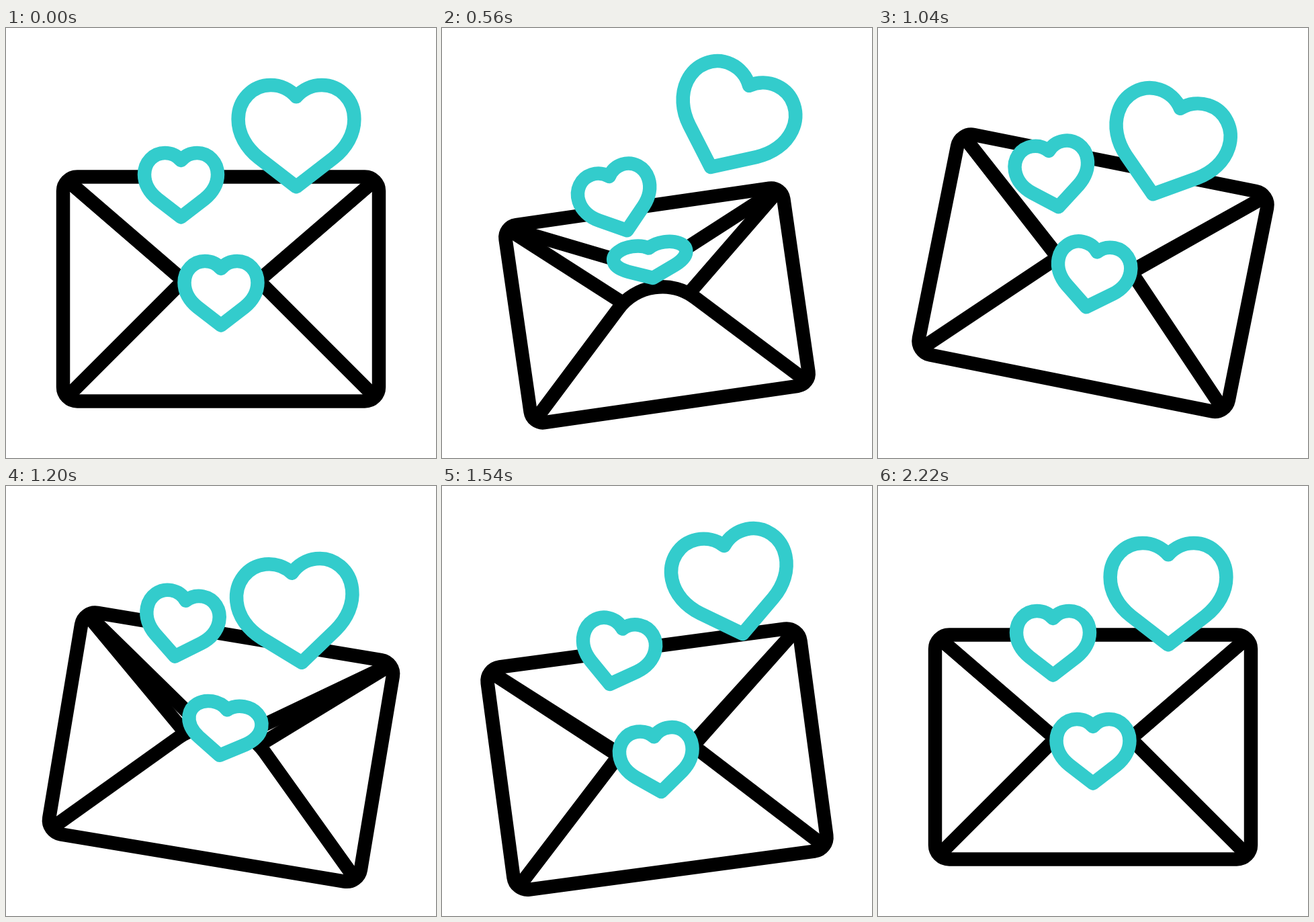
Animation, 640 px wide and 640 px high, one loop 2.4 s. Source, as an HTML page with a canvas:

```html
<!DOCTYPE html>
<html lang="en">
<head>
<meta charset="utf-8">
<title>Love letter</title>
<style>
  html, body { margin: 0; width: 100%; height: 100%; overflow: hidden; background: #fff; }
  canvas { display: block; width: 640px; height: 640px; }
</style>
</head>
<body>
<canvas id="stage" width="640" height="640"></canvas>
<script>
const ctx = document.getElementById('stage').getContext('2d');
const LOOP = 2400, START = 200;
const BLACK = '#000', TEAL = '#33cccc';
const HINGE = -167;

const clamp = x => Math.min(1, Math.max(0, x));
const ease = x => (1 - Math.cos(Math.PI * clamp(x))) / 2;

// Leaves 0, peaks at 1 halfway and returns to 0.
const dip = (t, from, to) => ease(2 * clamp((t - from) / (to - from))) *
  (t > (from + to) / 2 ? ease(2 - 2 * (t - from) / (to - from)) : 1);

// Four eased steps through 0, 1, -1, 1, 0.
function bounce(t, step) {
  const x = Math.min(4, Math.max(0, (t - START) / step));
  const c = Math.cos(Math.PI * x);
  return x > 1 && x < 3 ? -c : (1 - c) / 2;
}

// Three eased swings, then back to level.
function sway(t, beats, angles) {
  let from = START, angle = 0;
  beats.forEach((to, i) => {
    const next = angles[i] || 0;
    angle += (next - (angles[i - 1] || 0)) * ease((t - from) / (to - from));
    from = to;
  });
  return angle;
}
const BODY_BEATS = [700, 1100, 1500, 1800];
const HEART_BEATS = [800, 1400, 1800, 2200];

const place = (x, y, deg, scale = 1) =>
  new DOMMatrix().translate(x, y).rotate(deg).scale(scale, scale);

// Shapes are transformed, but the line weight stays constant.
function draw(path, matrix, color, filled) {
  const shape = new Path2D();
  shape.addPath(path, matrix);
  if (filled) {
    ctx.fillStyle = '#fff';
    ctx.fill(shape);
  }
  ctx.strokeStyle = color;
  ctx.stroke(shape);
}

// Builds a shape from its left half, mirrored around x = 0.
function mirrored(half) {
  const path = new Path2D(half);
  path.addPath(new Path2D(half), new DOMMatrix([-1, 0, 0, 1, 0, 0]));
  return path;
}

const heart = mirrored('M0-37C-6-44-15-48-24-48C-41-48-54.5-34-54.5-16' +
  'C-54.5-2-47 11-35 20.5L0 47.5');
const frame = new Path2D();
frame.roundRect(-235, HINGE, 470, 334, 21);
const sides = mirrored('M-225-158.5L-56-12.5');
const pocket = new Path2D('M-225 156.5L-65-3.5A92 92 0 0 1 65-3.5L225 156.5');
const flap = new Path2D('M-225 8.5L-30 176.5Q0 202 30 176.5L225 8.5');

function render(t) {
  ctx.fillStyle = '#fff';
  ctx.fillRect(0, 0, 640, 640);
  ctx.lineWidth = 20.5;
  ctx.lineCap = ctx.lineJoin = 'round';

  const squash = dip(t, START, 1000);
  const size = 1 - .113 * squash;
  const open = 1 - .48 * squash - .25 * dip(t, 1000, 1600);
  const lift = 27 * bounce(t, 500);

  const body = place(320, 388.5 + 25 * bounce(t, 400),
    sway(t, BODY_BEATS, [-10, 12.5, -8]), size);
  const lid = body.translate(0, HINGE).scale(1, open);

  draw(sides, body, BLACK);
  draw(pocket, body, BLACK, true);
  draw(flap, lid, BLACK, true);
  draw(frame, body, BLACK);

  draw(heart, lid.translate(0, 173.5).scale(1 / size, 1 / size), TEAL, true);
  draw(heart, place(260.5, 234 + lift, sway(t, HEART_BEATS, [-28, 24, -16])), TEAL, true);
  draw(heart, place(432, 161 - lift, sway(t, HEART_BEATS, [38.5, -21, 12]), 1.585), TEAL, true);
}

const start = performance.now();
function tick() {
  render((performance.now() - start) % LOOP);
  requestAnimationFrame(tick);
}
tick();
</script>
</body>
</html>
```
